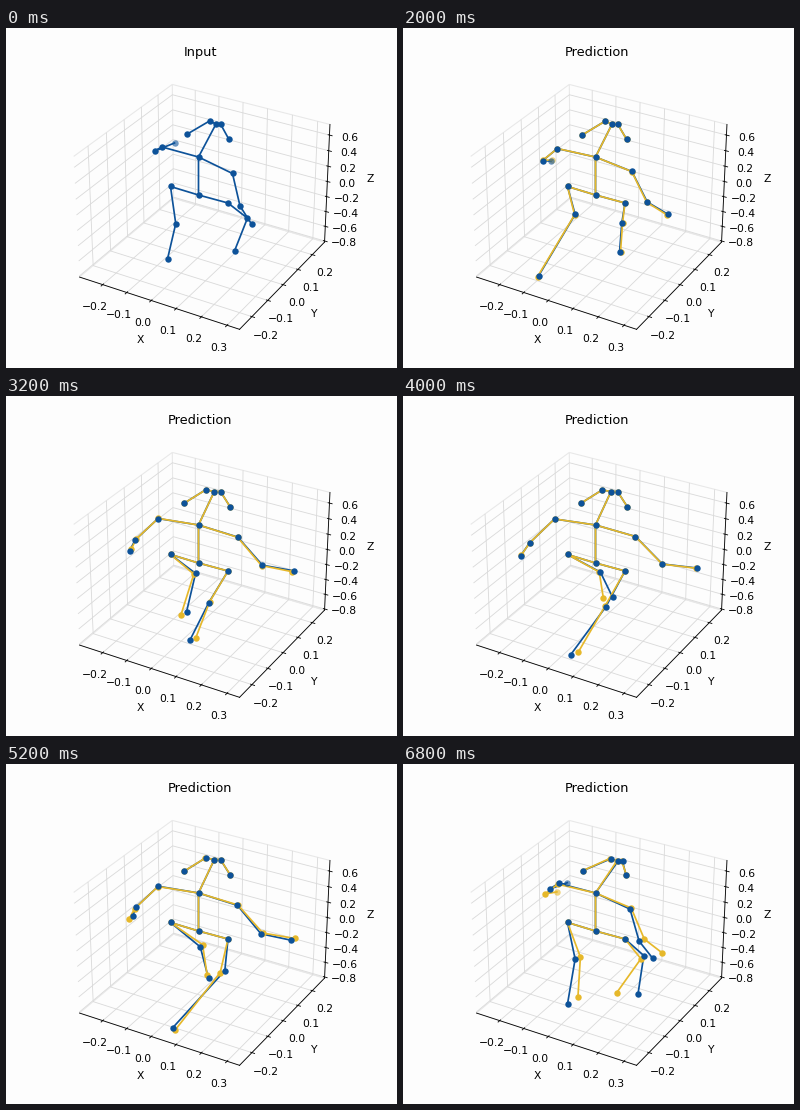
Recreate the animation shown at these times as a matplotlib script. Size 391x340 px, loop 7 s.

```python
import numpy as np
import matplotlib.pyplot as plt
from matplotlib.animation import FuncAnimation

W, H, DPI = 391, 340, 77
FRAMES, STEP = 35, 200
LOOP = FRAMES * STEP
PREDICT_AT = 1400
BLUE, YELLOW, PAPER = "#0d5299", "#e6b82a", "#fdfdfd"

# Joints in stage pixels
TORSO = {
    "pelvis": (193, 167), "chest": (193, 129),
    "l_hip": (165, 158.5), "r_hip": (222.5, 175),
}
# Upper body: arms folded, arms spread
UPPER = {
    "l_ear": [(181, 106.5), (178, 107.5)],
    "l_eye": [(204, 93), (199.5, 94)],
    "nose": [(210.5, 96), (208.5, 95.5)],
    "r_eye": [(215, 96), (215, 95.5)],
    "r_ear": [(223.5, 111.5), (225, 111)],
    "l_shoulder": [(156.5, 119), (152, 123)],
    "l_elbow": [(149, 123), (127, 147)],
    "l_hand": [(169, 115), (118, 160)],
    "r_shoulder": [(227, 145.5), (233, 140.5)],
    "r_elbow": [(234.5, 178), (260, 168)],
    "r_hand": [(246, 196), (294.5, 172)],
}
# Feet: key points as (time, x, y)
L_FOOT = [(0, 162, 231), (1200, 132, 250), (2000, 136, 248), (3200, 181, 216),
          (4000, 210, 201), (5200, 203, 214.5), (6800, 165, 240)]
R_FOOT = [(0, 229, 223), (1200, 233, 213), (2000, 217, 224.5), (3200, 184.5, 244),
          (4000, 168, 259), (5200, 167, 264), (6400, 215, 229), (6800, 235.5, 230)]

CHAINS = [
    ["l_foot", "l_knee", "l_hip", "pelvis", "r_hip", "r_knee", "r_foot"],
    ["pelvis", "chest", "nose"],
    ["l_ear", "l_eye", "nose", "r_eye", "r_ear"],
    ["l_hand", "l_elbow", "l_shoulder", "chest", "r_shoulder", "r_elbow", "r_hand"],
]


def spline(keys, t):
    """Cubic Hermite curve through the key points."""
    keys = np.array(keys, float)
    times, p = keys[:, 0], keys[:, 1:]
    slope = np.diff(p, axis=0) / np.diff(times)[:, None]
    m = np.empty_like(p)
    m[1:-1] = (p[2:] - p[:-2]) / (times[2:] - times[:-2])[:, None]
    m[0] = 2 * slope[0] - m[1]
    m[-1] = 2 * slope[-1] - m[-2]
    i = int(np.clip(np.searchsorted(times, t, "right") - 1, 0, len(times) - 2))
    d = times[i + 1] - times[i]
    s = (t - times[i]) / d
    return ((1 + 2 * s) * (1 - s) ** 2 * p[i] + s * (1 - s) ** 2 * d * m[i]
            + s * s * (3 - 2 * s) * p[i + 1] + s * s * (s - 1) * d * m[i + 1])


def wave(t, mid, amp, peak):
    return mid + amp * np.cos(2 * np.pi * (t - peak) / LOOP)


def ease(t, start, end):
    s = np.clip((t - start) / (end - start), 0, 1)
    return s * s * (3 - 2 * s)


def measured(t):
    pose = {name: np.array(p, float) for name, p in TORSO.items()}
    spread = max(0, np.cos(np.pi * (t - 4100) / 5700))
    for name, (folded, wide) in UPPER.items():
        pose[name] = (1 - spread) * np.array(folded) + spread * np.array(wide)
    for name in ("l_eye", "nose", "r_eye"):
        pose[name] += ease(t, 5200, 6800) * np.array([5, 1.5])
    pose["l_knee"] = np.array([wave(t, 182, 17, 4400), wave(t, 186, 10, 300)])
    pose["r_knee"] = np.array([wave(t, 222, 20, 100), wave(t, 199.5, 11.5, 4200)])
    pose["l_foot"] = spline(L_FOOT, t)
    pose["r_foot"] = spline(R_FOOT, t)
    return pose


def predicted(t):
    """Falls behind the measured pose and takes shorter steps."""
    pose = measured(t - .07 * (t - PREDICT_AT))
    shrink = .15 * ease(t, 2000, 3200)
    for name, mid in (("l_foot", 171), ("r_foot", 205)):
        pose[name][0] += shrink * (mid - pose[name][0])
    return pose


plt.rcParams.update({"font.family": "DejaVu Sans", "grid.color": "#dadada"})
fig = plt.figure(figsize=(W / DPI + 1e-6, H / DPI + 1e-6), dpi=DPI, facecolor=PAPER)

# Square 3D axes, placed in stage pixels
left, bottom, side = 52, 20.7, 284.9
ax = fig.add_axes([left / W, bottom / H, side / W, side / H], projection="3d")
ax.set_facecolor("none")
ax.view_init(30, -60)
ax.set_xlim(-.298, .348)
ax.set_ylim(-.276, .288)
ax.set_zlim(-.815, .735)
ax.set_xticks(np.arange(-2, 4) / 10)
ax.set_yticks(np.arange(-2, 3) / 10)
ax.set_zticks(np.arange(-8, 7, 2) / 10)
ax.set(xlabel="X", ylabel="Y", zlabel="Z")
for axis in (ax.xaxis, ax.yaxis, ax.zaxis):
    axis.pane.set(alpha=None, facecolor="none", edgecolor="#e8e8e8")
title = ax.set_title("Input")

# Flat layer for the skeletons
flat = fig.add_axes([0, 0, 1, 1])
flat.set(xlim=(.5, W + .5), ylim=(H, 0))
flat.axis("off")


class Skeleton:
    def __init__(self, color, line_z, dot_z):
        self.bones, = flat.plot([], [], color=color, lw=1.6, zorder=line_z)
        dot = dict(ls="", marker="o", ms=6, mew=0, color=color, zorder=dot_z)
        self.dots, = flat.plot([], [], **dot)
        self.hand, = flat.plot([], [], **dot)

    def show(self, on):
        for part in (self.bones, self.dots, self.hand):
            part.set_visible(on)

    def draw(self, pose):
        gap = np.full((1, 2), np.nan)
        bones = np.vstack([np.vstack([[pose[n] for n in chain], gap]) for chain in CHAINS])
        self.bones.set_data(bones.T)
        self.dots.set_data(np.array([p for n, p in pose.items() if n != "l_hand"]).T)
        hand = pose["l_hand"]
        self.hand.set_data([hand[0]], [hand[1]])
        # The hand fades when it points away from the viewer
        self.hand.set_alpha(.6 if hand[0] > pose["l_elbow"][0] else 1)


blue = Skeleton(BLUE, 3, 6)
yellow = Skeleton(YELLOW, 4, 5)


def update(frame):
    t = frame * STEP
    predicting = t >= PREDICT_AT
    title.set_text("Prediction" if predicting else "Input")
    blue.draw(measured(t))
    yellow.show(predicting)
    if predicting:
        yellow.draw(predicted(t))
    return []


anim = FuncAnimation(fig, update, frames=FRAMES, interval=STEP,
                     init_func=lambda: update(0), repeat=True, repeat_delay=0)
plt.show()
```
